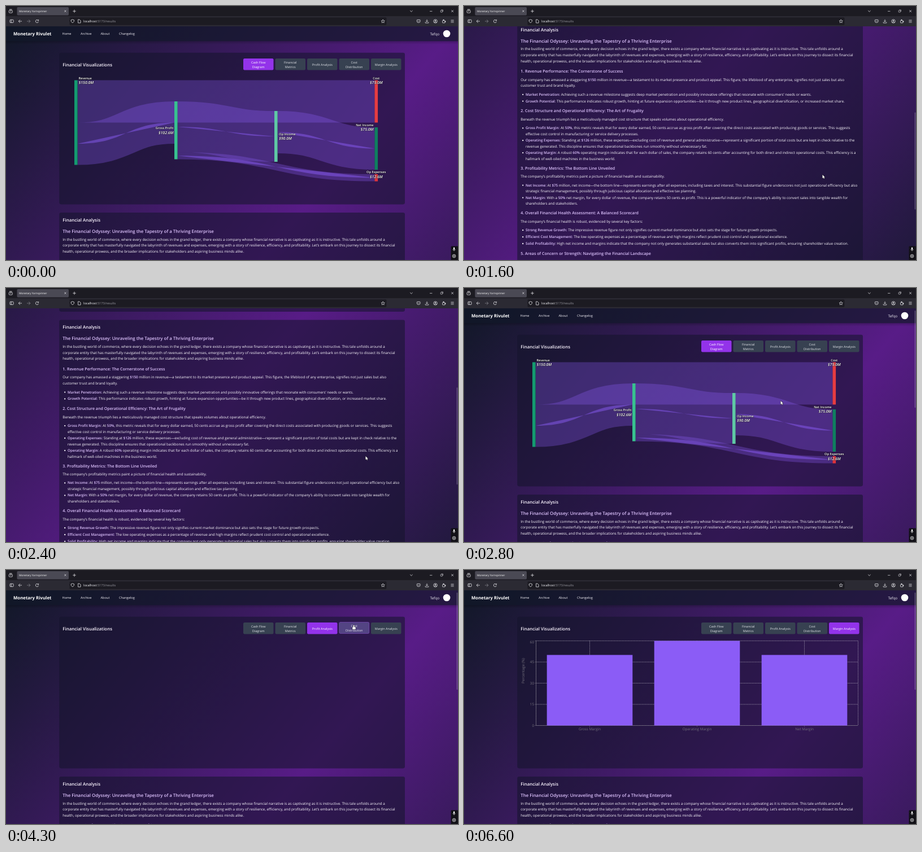
Animation of 800x450 px, one loop 6.7 s. Source, as an HTML page with a canvas:

```html
<!DOCTYPE html>
<html lang="en">
<head>
<meta charset="utf-8">
<title>Monetary Yarnspinner</title>
<style>
html, body { margin: 0; width: 100%; height: 100%; overflow: hidden; background: #1c1b22; }
canvas { display: block; }
</style>
</head>
<body>
<canvas id="stage" width="800" height="450"></canvas>
<script>
const ctx = document.getElementById('stage').getContext('2d');
const LOOP = 6700, STEP = 100, TOP = 36, PAGE_H = 947;
const FAMILY = '"Open Sans", "Noto Sans", sans-serif';
const LILAC = '#dfc4ff', BODY = '#fcfaff', VIOLET = '139,92,246';

// ---------- helpers ----------
function text(s, x, y, size, color, weight = '400', align = 'left') {
  ctx.font = `${weight} ${size}px ${FAMILY}`;
  ctx.textAlign = align;
  ctx.fillStyle = color;
  ctx.fillText(s, x, y);
}

function box(x, y, w, h, r, fill, stroke, width = 0.8) {
  ctx.beginPath();
  ctx.roundRect(x, y, w, h, r);
  if (fill) { ctx.fillStyle = fill; ctx.fill(); }
  if (stroke) { ctx.strokeStyle = stroke; ctx.lineWidth = width; ctx.stroke(); }
}

function line(color, width, ...pts) {
  ctx.beginPath();
  for (let i = 0; i < pts.length; i += 2) ctx.lineTo(pts[i], pts[i + 1]);
  ctx.strokeStyle = color;
  ctx.lineWidth = width;
  ctx.stroke();
}

function ring(x, y, r, color, width = 0.8, from = 0, to = Math.PI * 2) {
  ctx.beginPath();
  ctx.arc(x, y, r, from, to);
  ctx.strokeStyle = color;
  ctx.lineWidth = width;
  ctx.stroke();
}

function disc(x, y, r, color) {
  ctx.beginPath();
  ctx.arc(x, y, r, 0, Math.PI * 2);
  ctx.fillStyle = color;
  ctx.fill();
}

const clamp = v => Math.min(1, Math.max(0, v));
const smooth = v => v * v * (3 - 2 * v);

// Keys are [time, ...values]
function track(keys, t, ease = v => v) {
  const n = keys.findIndex(k => k[0] > t);
  if (n === 0) return keys[0].slice(1);
  if (n < 0) return keys[keys.length - 1].slice(1);
  const a = keys[n - 1], b = keys[n];
  const p = ease((t - a[0]) / (b[0] - a[0]));
  return a.slice(1).map((v, i) => v + (b[i + 1] - v) * p);
}

// ---------- timeline ----------
const SCROLL = [[930, 0], [1100, 85], [1600, 337.3], [2000, 533], [2100, 533], [2400, 309.5], [2800, 0]];
const POINTER = [
  [300, 808, 330], [900, 635, 299], [1100, 634.5, 299], [1600, 634.5, 299], [2400, 636.5, 298],
  [2800, 560.5, 200], [3300, 503, 102], [3600, 503, 102], [3900, 560, 101], [4050, 560, 101],
  [4300, 615.5, 97.5], [5000, 616, 98], [5300, 672, 101], [5900, 673, 102], [6400, 808, 150]
];
const CLICKS = [0, 3450, 4000, 4500, 5400];
const TABS = [['Cash Flow', 'Diagram'], ['Financial', 'Metrics'], ['Profit Analysis'], ['Cost', 'Distribution'], ['Margin Analysis']];

const pointerAt = t => track(POINTER, t, smooth);
const activeTab = t => CLICKS.filter(c => c <= t).length - 1;

function tabUnder(t) {
  const [x, y] = pointerAt(t);
  const i = Math.floor((x - 420) / 56.5);
  return y > 92 && y < 114 && i >= 0 && i < 5 && x - 420 - i * 56.5 < 53.5 ? i : -1;
}

// Share of the last 150 ms spent over a tab
function hoverOf(i, t) {
  let sum = 0;
  for (let k = 0; k < 5; k++) sum += tabUnder(t - k * 30) === i ? 0.2 : 0;
  return sum;
}

// ---------- article ----------
// kind, centre of first line, lines; *...* is emphasis
const ARTICLE = [
  ['title', 379, 'Financial Analysis'],
  ['lead', 399, 'The Financial Odyssey: Unraveling the Tapestry of a Thriving Enterprise'],
  ['p', 413.4, 'In the bustling world of commerce, where every decision echoes in the grand ledger, there exists a company whose financial narrative is as captivating as it is instructive. This tale unfolds around a',
    'corporate entity that has masterfully navigated the labyrinth of revenues and expenses, emerging with a story of resilience, efficiency, and profitability. Let’s embark on this journey to dissect its financial',
    'health, operational prowess, and the broader implications for stakeholders and aspiring business minds alike.'],
  ['h', 452.6, '1. Revenue Performance: The Cornerstone of Success'],
  ['p', 467.6, 'Our company has amassed a staggering *$150* million in revenue—a testament to its market presence and product appeal. This figure, the lifeblood of any enterprise, signifies not just sales but also',
    'customer trust and brand loyalty.'],
  ['li', 493.8, '*Market Penetration:* Achieving such a revenue milestone suggests deep market penetration and possibly innovative offerings that resonate with consumers’ needs or wants.'],
  ['li', 505.6, '*Growth Potential:* This performance indicates robust growth, hinting at future expansion opportunities—be it through new product lines, geographical diversification, or increased market share.'],
  ['h', 523.2, '2. Cost Structure and Operational Efficiency: The Art of Frugality'],
  ['p', 538.2, 'Beneath the revenue triumph lies a meticulously managed cost structure that speaks volumes about operational efficiency.'],
  ['li', 553.3, '*Gross Profit Margin:* At *50%*, this metric reveals that for every dollar earned, 50 cents accrue as gross profit after covering the direct costs associated with producing goods or services. This suggests',
    'effective cost control in manufacturing or service delivery processes.'],
  ['li', 575.2, '*Operating Expenses:* Standing at *$126* million, these expenses—excluding cost of revenue and general administrative—represent a significant portion of total costs but are kept in check relative to the',
    'revenue generated. This discipline ensures that operational backbones run smoothly without unnecessary fat.'],
  ['li', 597.1, '*Operating Margin:* A robust *60%* operating margin indicates that for each dollar of sales, the company retains 60 cents after accounting for both direct and indirect operational costs. This efficiency is a',
    'hallmark of well-oiled machines in the business world.'],
  ['h', 624.6, '3. Profitability Metrics: The Bottom Line Unveiled'],
  ['p', 639.4, 'The company’s profitability metrics paint a picture of financial health and sustainability.'],
  ['li', 654.6, '*Net Income:* At *$75* million, net income—the bottom line—represents earnings after all expenses, including taxes and interest. This substantial figure underscores not just operational efficiency but also',
    'strategic financial management, possibly through judicious capital allocation and effective tax planning.'],
  ['li', 676.6, '*Net Margin:* With a *50%* net margin, for every dollar of revenue, the company retains 50 cents as profit. This is a powerful indicator of the company’s ability to convert sales into tangible wealth for',
    'shareholders and stakeholders.'],
  ['h', 704.2, '4. Overall Financial Health Assessment: A Balanced Scorecard'],
  ['p', 718.9, 'The company’s financial health is robust, evidenced by several key factors:'],
  ['li', 734.2, '*Strong Revenue Growth:* The impressive revenue figure not only signifies current market dominance but also sets the stage for future growth prospects.'],
  ['li', 746.2, '*Efficient Cost Management:* The low operating expenses as a percentage of revenue and high margins reflect prudent cost control and operational excellence.'],
  ['li', 758, '*Solid Profitability:* High net income and margins indicate that the company not only generates substantial sales but also converts them into significant profits, ensuring shareholder value creation.'],
  ['h', 775.6, '5. Areas of Concern or Strength: Navigating the Financial Landscape'],
  ['p', 790.6, 'While the figures are strong, a careful reader will weigh both the risks and the advantages they reveal:'],
  ['li', 806, '*Cost Dependence:* Direct costs absorb half of all revenue, so a shift in supply prices could narrow the margins that the company enjoys today and should be watched with',
    'care from one period to the next.'],
  ['li', 828, '*Operational Strength:* Lean operating expenses leave room for investment, allowing the company to respond to changing demand without placing its earnings at risk.'],
  ['h', 846, 'Conclusion: The Next Chapter'],
  ['p', 861, 'The story told by these numbers is one of balance. Revenue flows steadily through each stage, costs are held in check, and half of every dollar earned remains as profit for the',
    'company and its shareholders. With continued discipline, the enterprise is well placed for the years ahead.']
];
const STYLE = {
  title: [7.85, '#fbf5ff', '600'], lead: [7.85, LILAC, '600'], h: [7.08, LILAC, '600'],
  p: [6.315, BODY, '400'], li: [6.315, BODY, '400']
};

function rich(s, x, y, [size, color, weight]) {
  s.split('*').forEach((part, i) => {
    if (i % 2) text(part, x, y, size, LILAC, '600');
    else text(part, x, y, size, color, weight);
    x += ctx.measureText(part).width;
  });
}

function article() {
  for (const [kind, y, ...lines] of ARTICLE) {
    const style = STYLE[kind], base = y + style[0] * 0.36;
    const x = kind === 'li' ? 109 : 100.3;
    if (kind === 'li') disc(104.2, y + 0.3, 1.15, BODY);
    lines.forEach((s, i) => rich(s, x, base + i * 10.65, style));
  }
}

// ---------- charts ----------
const LINKS = [ // x0, y0, x1, y1, thickness
  [127, 169, 652.5, 169, 75], [127, 244, 298, 206.5, 75], [304, 214, 475, 231, 90],
  [304, 265.3, 652.5, 304.3, 12.6], [481, 223.5, 652.5, 252.5, 75]
];
const NODES = [ // x, y, height, colour
  [121, 131.5, 150, '#149a70'], [298, 169, 102.5, '#38c190'], [475, 186, 90, '#5fc8a5'],
  [652.5, 131.5, 75, '#e63c41'], [652.5, 215, 75, '#0f7e5f'], [652.5, 298, 12.6, '#df343c']
];
const LABELS = [
  ['Revenue', '$150.0M', 128.5, 129.6, 'left'], ['Gross Profit', '$102.6M', 296.5, 218.3, 'right'],
  ['Op Income', '$90.0M', 483, 228.8, 'left'], ['Cost', '$75.0M', 655.3, 129.6, 'center'],
  ['Net Income', '$75.0M', 650.5, 213, 'right'], ['Op Expenses', '$12.6M', 655.3, 296.4, 'center']
];

function sankey() {
  for (const [x0, y0, x1, y1, w] of LINKS) {
    const mid = (x0 + x1) / 2;
    ctx.beginPath();
    ctx.moveTo(x0, y0);
    if (y0 === y1) ctx.lineTo(x1, y1);
    else ctx.bezierCurveTo(mid, y0, mid, y1, x1, y1);
    ctx.fillStyle = `rgba(${VIOLET},.48)`;
    ctx.fill();
    ctx.strokeStyle = `rgba(${VIOLET},.3)`;
    ctx.lineWidth = w;
    ctx.stroke();
  }
  for (const [x, y, h, color] of NODES) box(x, y, 5.6, h, 0, color);
  ctx.strokeStyle = 'rgba(0,0,0,.55)';
  ctx.lineJoin = 'round';
  for (const [name, value, x, y, align] of LABELS) {
    for (const [s, dy, size, weight] of [[name, 0, 5.6, '600'], [value, 8.4, 6.9, 'italic 600']]) {
      ctx.font = `${weight} ${size}px ${FAMILY}`;
      ctx.textAlign = align;
      ctx.lineWidth = 0.9;
      ctx.strokeText(s, x, y + dy);
      text(s, x, y + dy, size, '#fff', weight, align);
    }
  }
}

function margins(p) {
  const L = 127.5, R = 697.5, T = 125.5, B = 275.5, gray = '#74717d', grid = '#c6c2ce';
  const bars = [['Gross Margin', 50], ['Operating Margin', 60], ['Net Margin', 50]];
  ctx.setLineDash([1.25, 1.25]);
  for (let i = 0; i < 5; i++) line(grid, 0.7, L, T + i * 37.5, R, T + i * 37.5);
  for (const x of [L, 222.5, 412.5, 602.5, R]) line(grid, 0.7, x, T, x, B);
  ctx.setLineDash([]);
  line(gray, 0.5, L, T, L, B, R, B);
  for (let i = 0; i < 5; i++) {
    const y = T + i * 37.5;
    line(gray, 0.5, L - 2.5, y, L, y);
    text(60 - i * 15, 124, (i ? y : 128) + 2.3, 6.3, gray, '400', 'right');
  }
  bars.forEach(([name, v], i) => {
    const x = 222.5 + i * 190, h = v * 2.5 * p;
    line(gray, 0.5, x, B, x, B + 2.5);
    box(x - 75.8, B - h, 151.6, h, 0, `rgb(${VIOLET})`);
    text(name, x, 283.5, 6.3, gray, '400', 'center');
  });
  ctx.save();
  ctx.translate(107.2, 178.5);
  ctx.rotate(-Math.PI / 2);
  text('Percentage (%)', 0, 0, 6.5, gray, '400', 'center');
  ctx.restore();
}

// ---------- page ----------
function backdrop() {
  const W = 800, gx = 1 / W, gy = 1 / PAGE_H, k = 1 / (gx * gx + gy * gy);
  const cx = W / 2, cy = TOP + PAGE_H / 2;
  const g = ctx.createLinearGradient(cx - gx * k, cy - gy * k, cx + gx * k, cy + gy * k);
  g.addColorStop(0, '#111827');
  g.addColorStop(0.5, '#581c87');
  g.addColorStop(1, '#111827');
  ctx.fillStyle = g;
  ctx.fillRect(0, TOP, W, PAGE_H);
}

function header() {
  ctx.fillStyle = 'rgba(17,24,39,.7)';
  ctx.fillRect(0, TOP, 800, 26.3);
  const g = ctx.createLinearGradient(0, 62, 0, 68);
  g.addColorStop(0, 'rgba(0,0,0,.22)');
  g.addColorStop(1, 'rgba(0,0,0,0)');
  ctx.fillStyle = g;
  ctx.fillRect(0, 62.3, 800, 6);
  text('Monetary Rivulet', 13, 52.3, 7.8, '#fff', '700');
  [['Home', 99.5], ['Archive', 132], ['About', 167.5], ['Changelog', 200]]
    .forEach(([s, x]) => text(s, x, 51.4, 5.65, '#f4f2f8'));
  text('Tefqo', 767, 51.7, 6.4, '#f4f2f8', '400', 'right');
  disc(780, 49, 6.3, '#fff');
}

function tabs(t) {
  const active = activeTab(t);
  TABS.forEach((lines, i) => {
    const x = 420 + i * 56.5, h = hoverOf(i, t), y = 93 - h;
    box(x, y, 53.5, 20.5, 2.2, i === active ? '#9333ea' : '#374151');
    if (i !== active && h) {
      ctx.globalAlpha = h;
      box(x + 0.3, y + 0.3, 52.9, 19.9, 2, '#5a4590', '#8a4bd0', 0.7);
      ctx.globalAlpha = 1;
    }
    const color = i === active ? '#fff' : '#e2e5ea';
    lines.forEach((s, k) => text(s, x + 26.75, y + (lines.length > 1 ? 8.5 + k * 8.2 : 12.5), 5.5, color, '400', 'center'));
  });
}

function page(t, scroll) {
  ctx.save();
  ctx.beginPath();
  ctx.rect(0, TOP, 800, 450 - TOP);
  ctx.clip();
  ctx.translate(0, -scroll);
  backdrop();
  header();
  const panel = 'rgba(21,20,43,.56)';
  box(94.3, 82.8, 611.7, 268.6, 3.3, panel);
  box(94.3, 366, 611.7, 592, 3.3, panel);
  text('Financial Visualizations', 100.3, 106.7, 7.85, '#fbf5ff', '600');
  tabs(t);
  const tab = activeTab(t);
  if (tab === 0) sankey();
  if (tab === 4) margins(smooth(clamp((t - CLICKS[4]) / 800)));
  article();
  ctx.restore();
  if (t >= 800) box(797.8, 40 + scroll * 0.44, 1.2, 172, 0.6, 'rgba(176,168,190,.5)');
}

// ---------- browser frame ----------
function chrome() {
  const ink = '#e6e6ea', dim = '#85858c';
  ctx.fillStyle = '#1c1b22';
  ctx.fillRect(0, 0, 800, 18);
  ctx.fillStyle = '#2b2a33';
  ctx.fillRect(0, 18, 800, 18);
  box(19.5, 2, 91.5, 14.5, 1.8, '#4a4954');
  text('Monetary Yarnspinner', 23, 11.3, 4.75, '#fff');
  line(ink, 0.7, 103.3, 7.5, 106.5, 10.7);
  line(ink, 0.7, 106.5, 7.5, 103.3, 10.7);
  line(ink, 0.8, 118.3, 9.2, 123.7, 9.2);
  line(ink, 0.8, 121, 6.5, 121, 11.9);
  box(5.3, 7.5, 6, 4.6, 1, null, ink);
  line(ink, 0.8, 6, 6, 10.6, 6);
  line(ink, 0.8, 7.2, 9.3, 9.4, 9.3);
  line(ink, 0.8, 715.2, 8, 717.4, 10.2, 719.6, 8);
  line(ink, 0.7, 750, 9.3, 754.4, 9.3);
  box(769.2, 7.8, 3.2, 3.2, 0.4, null, ink, 0.6);
  line(ink, 0.6, 770.4, 6.9, 773.4, 6.9, 773.4, 9.9);
  line(ink, 0.7, 788.2, 7.2, 792, 11);
  line(ink, 0.7, 792, 7.2, 788.2, 11);

  box(7, 24.3, 6.2, 5.2, 1, null, ink);
  line(ink, 0.8, 9.2, 24.3, 9.2, 29.5);
  line(ink, 0.8, 28, 27, 22.3, 27);
  line(ink, 0.8, 24.9, 24.3, 22.2, 27, 24.9, 29.7);
  line(dim, 0.8, 37.2, 27, 42.9, 27);
  line(dim, 0.8, 40.3, 24.3, 43, 27, 40.3, 29.7);
  ring(55, 27, 2.6, ink, 0.8, 0.3, 5.5);
  line(ink, 0.8, 57.6, 23.9, 57.6, 26, 55.5, 26);

  box(112.5, 20.2, 561, 13.6, 1.8, '#1c1b22');
  line(ink, 0.8, 117.8, 23.9, 120.5, 24.9, 120.2, 27.6, 117.8, 30, 115.4, 27.6, 115.1, 24.9, 117.8, 23.9);
  line(ink, 0.8, 127.6, 24, 130, 24, 132, 26, 132, 30, 127.6, 30, 127.6, 24);
  text('localhost', 137, 29.2, 5.6, '#fbfbfe');
  text(':5173/results', 137 + ctx.measureText('localhost').width, 29.2, 5.6, '#9a9aa2');

  ctx.beginPath();
  for (let i = 0; i < 10; i++) {
    const r = i % 2 ? 1.5 : 3.3, a = i * Math.PI / 5 - Math.PI / 2;
    ctx.lineTo(667.2 + r * Math.cos(a), 27.2 + r * Math.sin(a));
  }
  ctx.closePath();
  ctx.strokeStyle = ink;
  ctx.lineWidth = 0.7;
  ctx.stroke();

  box(727.3, 24.4, 5.8, 5, [0.8, 0.8, 2.6, 2.6], null, ink);
  line(ink, 0.7, 728.8, 26.4, 730.2, 27.8, 731.6, 26.4);
  line(ink, 0.8, 745, 23.8, 745, 28);
  line(ink, 0.8, 743.2, 26.3, 745, 28.1, 746.8, 26.3);
  line(ink, 0.8, 742.2, 28.4, 742.2, 30, 747.8, 30, 747.8, 28.4);
  ring(760, 27, 3.2, ink);
  disc(760, 26.1, 1.1, ink);
  ring(760, 29.6, 1.7, ink, 0.8, Math.PI, Math.PI * 2);
  box(772.6, 25.7, 4.4, 4.2, 0.6, null, ink);
  disc(774.4, 24.9, 1.1, ink);
  disc(777.4, 27.6, 1.1, ink);
  for (const y of [25, 27, 29]) line(ink, 0.7, 787.4, y, 792.6, y);
}

function recorder() {
  box(787.5, 425.5, 13, 25, [1.5, 0, 0, 0], '#121117');
  box(791.9, 427.6, 2.2, 4.2, 1.1, '#fff');
  ring(793, 430.8, 2.1, '#fff', 0.6, 0, Math.PI);
  line('#fff', 0.6, 793, 432.9, 793, 434.3);
  ring(793, 443, 2.8, '#fff', 0.8);
  line('#fff', 0.8, 791.9, 441.9, 794.1, 444.1);
  line('#fff', 0.8, 794.1, 441.9, 791.9, 444.1);
}

function pointer(t, scroll) {
  const [x, y] = pointerAt(t), shape = new Path2D();
  if (x > 800) return;
  ctx.save();
  ctx.translate(x, y);
  if (scroll === 0 && tabUnder(t) >= 0) {
    shape.roundRect(-0.9, 0, 1.9, 5.5, 0.9);
    shape.roundRect(-2.3, 3.4, 5.6, 4.4, 1.4);
  } else {
    [[0, 0], [0, 6.2], [1.5, 4.9], [2.5, 7.1], [3.5, 6.6], [2.5, 4.5], [4.4, 4.4]]
      .forEach(p => shape.lineTo(...p));
    shape.closePath();
  }
  ctx.strokeStyle = '#111';
  ctx.lineWidth = 1;
  ctx.stroke(shape);
  ctx.fillStyle = '#fff';
  ctx.fill(shape);
  ctx.restore();
}

function draw(t) {
  const [scroll] = track(SCROLL, t);
  ctx.textRendering = 'geometricPrecision';
  page(t, scroll);
  chrome();
  recorder();
  pointer(t, scroll);
}

const start = performance.now();
function tick() {
  const t = (performance.now() - start) % LOOP;
  draw(Math.floor(t / STEP) * STEP);
  requestAnimationFrame(tick);
}
tick();
</script>
</body>
</html>
```
